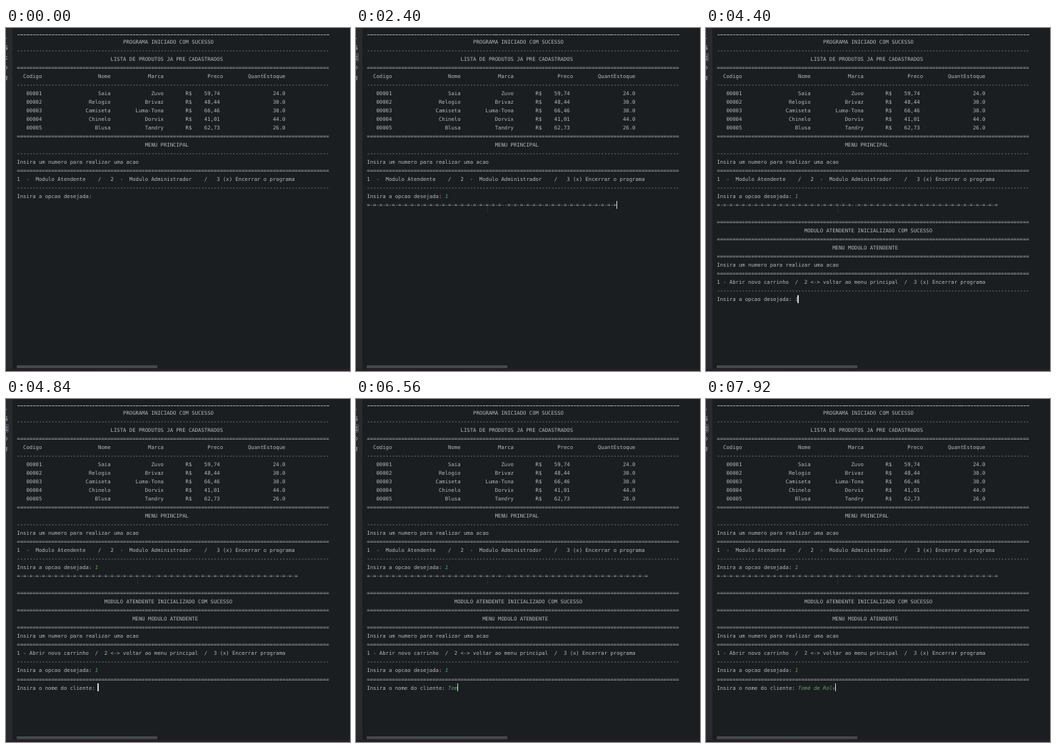
These frames come from a looping animation (482 px wide and 480 px high, 8 s). An HTML page:

```html
<!DOCTYPE html>
<html lang="pt">
<head>
<meta charset="utf-8">
<title>Terminal</title>
<style>
  html, body { margin: 0; width: 100%; height: 100%; overflow: hidden; background: #1b1e20; }
  #stage { position: relative; width: 482px; height: 480px; overflow: hidden; background: #1b1e20; }
  #stage > * { position: absolute; }
  #side { left: 0; top: 0; width: 9px; height: 477px; background: #282a2e; }
  #hover { left: 0; top: 35px; width: 4px; height: 12px; border-radius: 0 2px 2px 0; background: #46494d;
    animation: hover 8s step-end infinite; }
  #icons { left: 0; top: 0; }
  #foot { left: 0; top: 477px; width: 482px; height: 3px; background: linear-gradient(#2b242b, #241a22); }
  #bar { left: 15px; top: 472px; width: 197px; height: 4px; background: #45484a; }
  #beam { left: 184px; top: 251px; width: 1px; height: 9px;
    background: repeating-linear-gradient(#45484b 0 1px, transparent 1px 3px);
    animation: beam 8s step-end infinite; }
  #top { left: 15.5px; top: 9px; width: 437px; height: 1px;
    background: repeating-linear-gradient(90deg, #a0a2a5 0 3.4px, #3c3f41 3.4px 4.378px); }
  #term { left: 15.3px; top: 2px; color: #b4b6ba; white-space: pre; text-rendering: geometricPrecision;
    font: 7.272px/12.03px "DejaVu Sans Mono", "Noto Sans Mono", monospace; font-variant-ligatures: none; }
  #term div { height: 12.03px; }
  #term i { color: #619f69; }
  #caret { position: absolute; width: 1.4px; height: 11px; margin: -.5px 0 0 -.6px; background: #d0d2d6; }
  @keyframes hover { 0% { opacity: 0 } 10% { opacity: 1 } }
  @keyframes beam { 0% { opacity: 0 } 13.5% { opacity: 1 } }
</style>
</head>
<body>
<div id="stage">
  <div id="side"></div>
  <div id="hover"></div>
  <svg id="icons" width="9" height="80" fill="none" stroke="#a4a6aa" stroke-width="1">
    <path d="M0 14.5h1M2 25H0M0 27.500h1.500v2.500H0M0 39l1.500 2M0 43.500h2M0 53l2 2.500L0 58M0 68h2M1 68v4.500H0"/>
  </svg>
  <div id="foot"></div>
  <div id="bar"></div>
  <div id="top"></div>
  <div id="term"></div>
  <div id="beam"></div>
</div>
<script>
const LOOP = 8000, PITCH = 12.03;
const dash = '-'.repeat(100), rule = '='.repeat(100);
const weave = '=-'.repeat(22) + '-' + '=-'.repeat(22) + '=';
const at = (col, text) => ' '.repeat(col) + text;

const product = ([code, name, brand, price, stock]) =>
  at(3, code) + name.padStart(22) + brand.padStart(17) + at(7, 'R$') + price.padStart(9) + stock.padStart(21);

const lines = [
  '',
  at(34, 'PROGRAMA INICIADO COM SUCESSO'),
  dash,
  at(30, 'LISTA DE PRODUTOS JA PRE CADASTRADOS'),
  rule,
  at(2, 'Codigo') + at(18, 'Nome') + at(12, 'Marca') + at(14, 'Preco') + at(8, 'QuantEstoque'),
  dash,
  ...[
    ['00001', 'Saia', 'Zuvo', '59,74', '24.0'],
    ['00002', 'Relogio', 'Brivaz', '48,44', '30.0'],
    ['00003', 'Camiseta', 'Luma-Tona', '66,46', '30.0'],
    ['00004', 'Chinelo', 'Dorvix', '41,01', '44.0'],
    ['00005', 'Blusa', 'Tandry', '62,73', '26.0']
  ].map(product),
  rule,
  at(41, 'MENU PRINCIPAL'),
  dash,
  'Insira um numero para realizar uma acao',
  rule,
  '1  -  Modulo Atendente    /   2  -  Modulo Administrador    /   3 (x) Encerrar o programa',
  dash,
  'Insira a opcao desejada: ',
  weave,
  '',
  rule,
  at(28, 'MODULO ATENDENTE INICIALIZADO COM SUCESSO'),
  rule,
  at(37, 'MENU MODULO ATENDENTE'),
  rule,
  'Insira um numero para realizar uma acao',
  rule,
  '1 - Abrir novo carrinho  /  2 <-> voltar ao menu principal  /  3 (x) Encerrar programa',
  dash,
  'Insira a opcao desejada: ',
  rule,
  'Insira o nome do cliente: '
];

// Keystroke times for each prompt row
const inputs = {
  19: { text: '1', keys: [1720] },
  31: { text: '1', keys: [4400] },
  33: { text: 'Tomé de Rolv',
    keys: [5960, 6280, 6400, 6600, 6720, 6880, 7080, 7240, 7480, 7600, 7760, 7920] }
};

// time, last visible row, its visible length
const output = [[0, 19, 100], [2320, 20, 0], [2360, 20, 40], [2400, 20, 80], [2520, 31, 100], [4840, 33, 100]];
// time, caret opacity
const blink = [[0, 0], [320, .5], [400, 1], [1320, 0], [1720, 1], [3320, 0], [3840, .5], [3880, 1],
  [4320, .5], [4400, 1], [5400, 0], [5840, 1]];

const term = document.getElementById('term');
const rows = lines.map(() => {
  const row = document.createElement('div');
  row.append(document.createElement('span'), document.createElement('i'));
  term.append(row);
  return row;
});
const caret = document.createElement('b');
caret.id = 'caret';
term.append(caret);

const latest = (list, t) => list.filter(e => e[0] <= t).pop();
const setText = (el, text) => { if (el.textContent !== text) el.textContent = text; };

function draw(t) {
  const [, last, length] = latest(output, t);
  let col = 0;
  rows.forEach((row, r) => {
    const text = r > last ? '' : r === last ? lines[r].slice(0, length) : lines[r];
    const input = inputs[r];
    const typed = input ? input.text.slice(0, input.keys.filter(k => k <= t).length) : '';
    setText(row.firstChild, text);
    setText(row.lastChild, typed);
    if (r === last) col = text.length + typed.length;
  });
  caret.style.left = col + 'ch';
  caret.style.top = last * PITCH + 'px';
  caret.style.opacity = latest(blink, t)[1];
}

function tick() {
  draw(performance.now() % LOOP);
  requestAnimationFrame(tick);
}
tick();
</script>
</body>
</html>
```
